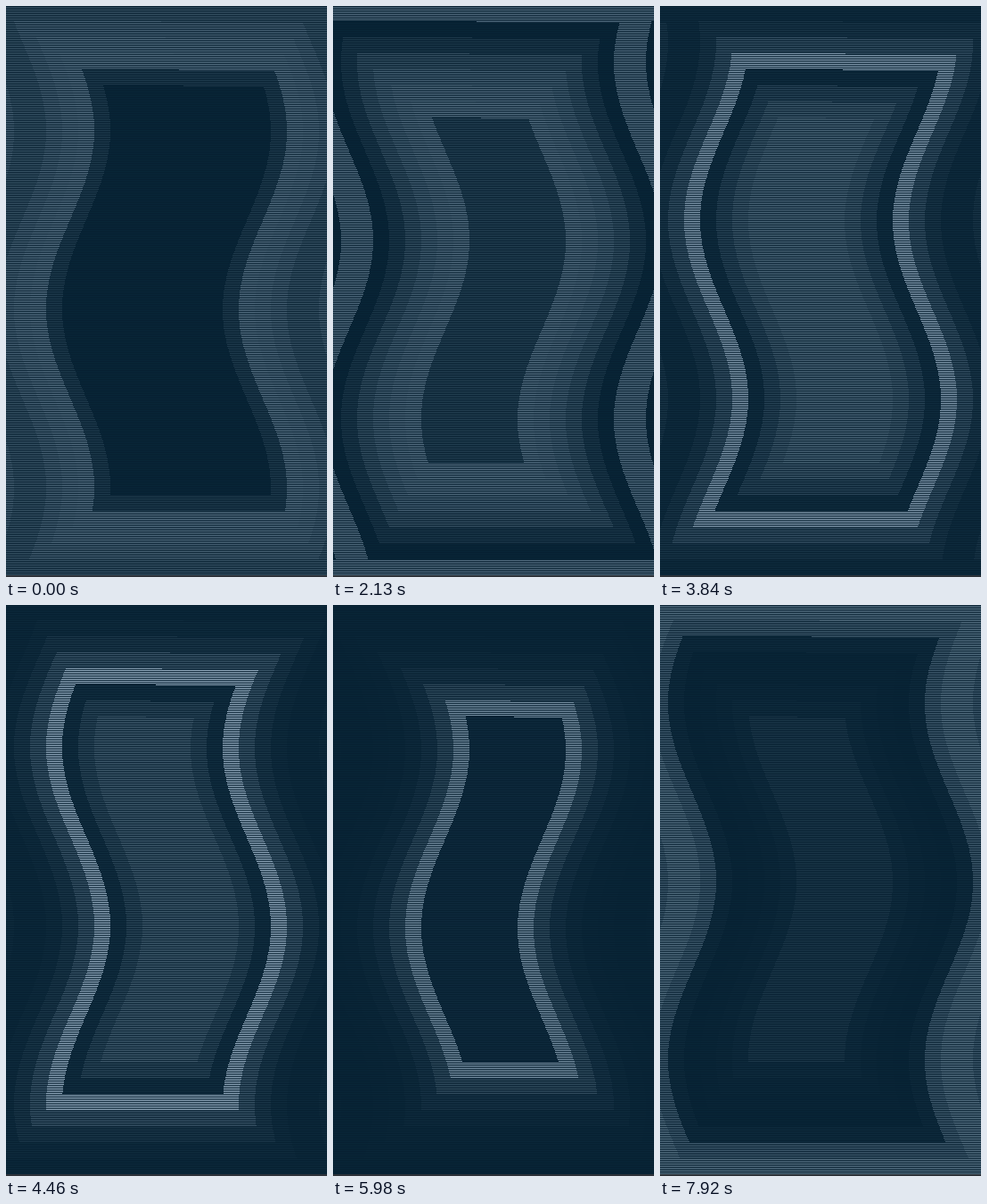
An HTML page for the animation above (8 s loop, 360 px wide and 640 px high).

```html
<!DOCTYPE html>
<html lang="en">
<head>
<meta charset="utf-8">
<title>Scanline echo</title>
<style>
  html, body { margin: 0; width: 100%; height: 100%; overflow: hidden; background: #061f30; }
  svg { display: block; width: 100vw; height: 100vh; }
</style>
</head>
<body>
<svg viewBox="0 0 360 640" shape-rendering="crispEdges">
  <defs>
    <pattern id="gaps" width="8" height="2" patternUnits="userSpaceOnUse">
      <rect width="8" height="1" fill="#061f30"/>
    </pattern>
  </defs>
  <g id="rings"></g>
  <rect width="360" height="640" fill="url(#gaps)"/>
  <rect y="638" width="360" height="2" fill="#2c3138"/>
</svg>
<script>
const LOOP = 8000, W = 360, STEP = 18, LEVELS = 8;
const DELAY = 692;               // ms for a pulse to travel one ring inward
const AMP = 27, WAVE = 400, SPEED = 0.13;
const DARK = [9, 38, 56], LIGHT = [208, 230, 250];

const group = document.getElementById('rings');
const rings = Array.from({ length: LEVELS }, () =>
  group.appendChild(document.createElementNS('http://www.w3.org/2000/svg', 'path')));

// Soft swell: [age in rings, brightness]
const SWELL = [[-2, 0], [-1.4, .03], [-1, .12], [-.4, .3], [0, .41], [.6, .42],
  [1, .39], [2, .34], [3, .25], [3.5, .18], [4, .11], [4.5, .04], [5, 0]];

function swell(age) {
  const i = SWELL.findIndex(p => p[0] > age);
  if (i < 1) return 0;
  const [a, u] = SWELL[i - 1], [b, v] = SWELL[i];
  return u + (v - u) * (age - a) / (b - a);
}

const flash = age => age < 0 ? 0 : Math.exp(-age);

// Every ring repeats the outermost one, a fixed delay later
function glow(level, t) {
  const age = start => (t - start) / DELAY - level;
  return Math.max(swell(age(-2076)), flash(age(1470)), swell(age(7500)));
}

function color(v) {
  return `rgb(${DARK.map((c, i) => Math.round(c + (LIGHT[i] - c) * v))})`;
}

function shift(y, t) {
  const phase = (y - 139 + SPEED * t) / WAVE;
  return Math.round(AMP * Math.cos(2 * Math.PI * phase));
}

function outline(level, t, offset) {
  const inset = level * STEP;
  const top = inset - 1, bottom = 638 - inset;
  const left = inset + offset, right = W - inset + offset;
  let d = `M${left + shift(top, t)} ${top}`;
  for (let y = top; y < bottom; y += 2) d += `H${left + shift(y, t)}V${y + 2}`;
  for (let y = bottom - 2; y >= top; y -= 2) d += `H${right + shift(y, t)}V${y}`;
  return d + 'Z';
}

function shape(level, t) {
  if (level === 0) return `M0 0H${W}V640H0Z`;
  // Rows wrap around the sides, which only the widest shape reaches
  const offsets = level === 1 ? [-W, 0, W] : [0];
  return offsets.map(o => outline(level, t, o)).join('');
}

function draw(t) {
  rings.forEach((ring, level) => {
    ring.setAttribute('d', shape(level, t));
    ring.setAttribute('fill', color(glow(level, t)));
  });
}

const begin = performance.now();
function tick() {
  draw((performance.now() - begin) % LOOP);
  requestAnimationFrame(tick);
}
tick();
</script>
</body>
</html>
```
